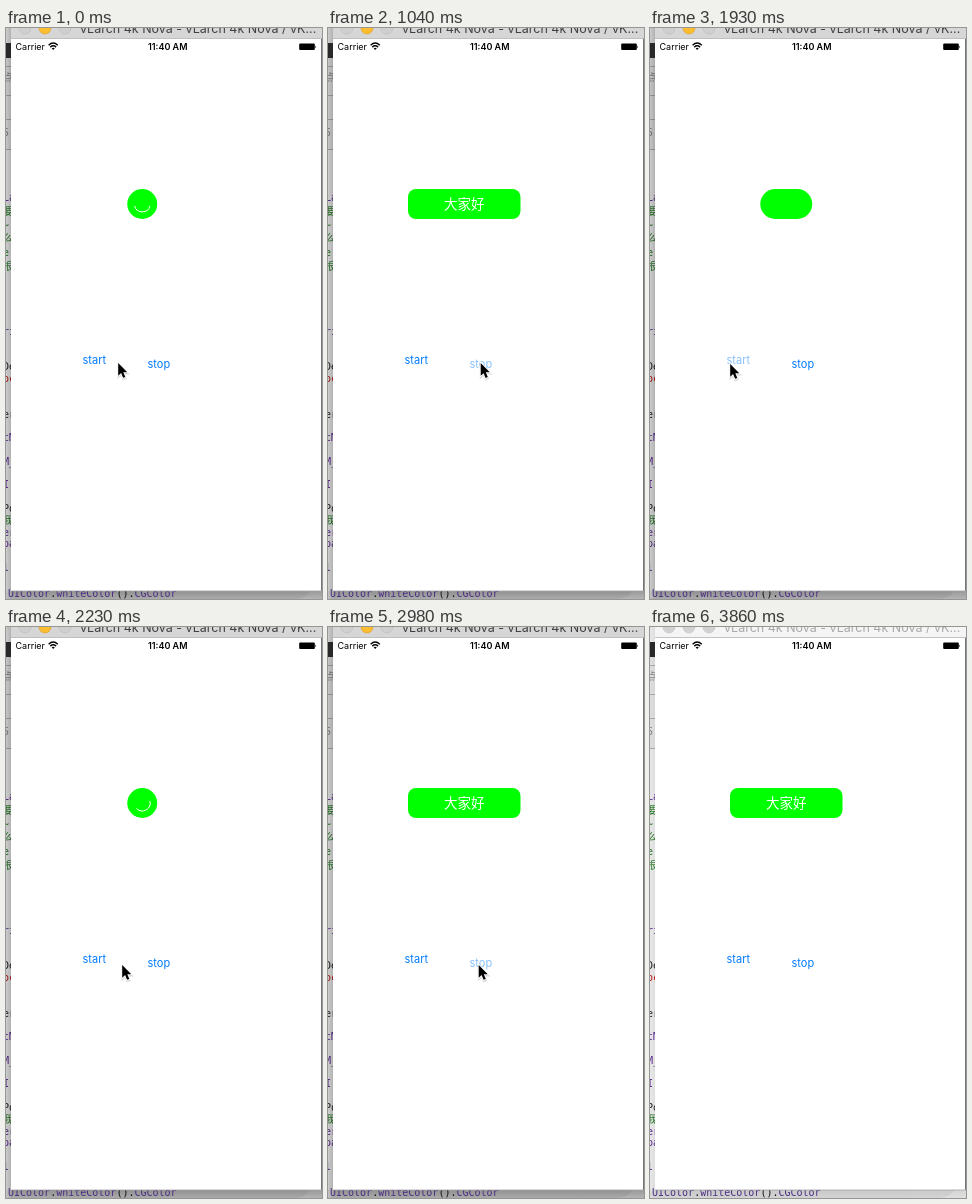
Animation, 316 px wide and 571 px high, one loop 3.99 s. Source, as an HTML page:

```html
<!DOCTYPE html>
<html lang="en">
<head>
<meta charset="utf-8">
<title>Button spinner</title>
<style>
html, body { margin: 0; width: 100%; height: 100%; overflow: hidden; background: #fff; }
svg { display: block; width: 316px; height: 571px; }
text { font-family: Inter, "Open Sans", sans-serif; }
.code text, text.code { font: 10px "DejaVu Sans Mono", "Noto Sans CJK SC", monospace; white-space: pre; }
.label { font-size: 11px; fill: #007aff; }
.status { font-size: 9px; }
.hello { font: 300 13.5px "Noto Sans CJK SC", "Noto Sans CJK", sans-serif; fill: #fff; text-anchor: middle; }
#title { font-size: 12.5px; fill: #414141; }
#bar { fill: #d6d6d6; }
.light { fill: #cfcfcf; stroke: #bebebe; stroke-width: .7; }
#yellow { fill: #fdbd30; stroke: #dfa02b; }
.idle #title { fill: #a9a9a9; }
.idle #bar { fill: #f5f5f5; }
.idle #yellow, .idle .light { fill: #d2d2d2; stroke: #c6c6c6; }
.idle #shade { opacity: .35; }
</style>
</head>
<body>
<svg id="stage" viewBox="0 0 316 571">
  <defs>
    <linearGradient id="side"><stop stop-opacity=".17"/><stop offset="1" stop-opacity=".28"/></linearGradient>
    <linearGradient id="under" x2="0" y2="1"><stop stop-opacity=".38"/><stop offset="1" stop-opacity=".27"/></linearGradient>
    <clipPath id="strip"><rect width="5" height="571"/></clipPath>
    <path id="arrow" d="M0 0V14.6L3.3 11.6 5.6 17 8.1 15.9 5.8 10.7H10.3Z"/>
  </defs>

  <!-- editor behind the window -->
  <rect width="316" height="571" fill="#f6f6f6"/>
  <path d="M0 563H304Q300 571 288 571H0Z" fill="#e9e9e9"/>
  <rect y="30" width="5" height="91" fill="#ededed"/>
  <path d="M0 38.5H5M0 67.5H5M0 91.5H5M0 121.5H5" stroke="#b5b5b5"/>
  <g class="code" id="margin" clip-path="url(#strip)"></g>
  <g id="shade">
    <rect width="5" height="571" fill="url(#side)"/>
    <rect x="5" y="563" width="311" height="8" fill="url(#under)"/>
  </g>
  <rect y="15" width="5" height="15" fill="#292929"/>
  <text class="code" x="2" y="569" fill="#4b2d82">UIColor<tspan fill="#111">.</tspan>whiteColor<tspan fill="#111">().</tspan>CGColor</text>

  <!-- simulator window -->
  <rect x="5" y="10" width="310" height="553" fill="#fff"/>
  <path d="M315.5 10V563" stroke="#757575"/>
  <path d="M5 563H316" stroke="#a2a2a2" stroke-width=".8"/>
  <rect id="bar" x="5" width="311" height="10.5"/>
  <path d="M5 10.5H316" stroke="#b4b4b4" stroke-width=".8"/>
  <circle class="light" cx="19" r="6"/>
  <circle class="light" id="yellow" cx="39" r="6"/>
  <circle class="light" cx="59" r="6"/>
  <text id="title" x="74" y="5.3">vLarch 4k Nova - vLarch 4k Nova / vK...</text>

  <!-- status bar -->
  <text class="status" x="9.5" y="22">Carrier</text>
  <path d="M42.6 17.2Q47.2 13 51.8 17.2M44.3 19.1Q47.2 16.6 50.1 19.1" fill="none" stroke="#000" stroke-width="1.4"/>
  <path d="M45.6 20.3Q47.2 19 48.8 20.3L47.2 22Z"/>
  <text class="status" x="161.7" y="22" font-weight="600" text-anchor="middle">11:40 AM</text>
  <rect x="293.2" y="15.5" width="15.6" height="6.6" rx="1"/>
  <path d="M309.4 17.4Q311 18.8 309.4 20.2Z"/>

  <!-- app -->
  <rect id="pill" y="161" height="30" fill="#0f0"/>
  <text class="hello" id="hello" x="136.25" y="181">大家好</text>
  <path id="arc" fill="none" stroke="#fff"/>
  <text class="label" id="start" x="76.5" y="336">start</text>
  <text class="label" id="stop" x="141.5" y="340">stop</text>

  <g id="cursor">
    <use href="#arrow" transform="translate(.9 2.6) scale(.88)" fill="none" stroke="#000" stroke-opacity=".14" stroke-width="2.4"/>
    <use href="#arrow" transform="translate(.7 1.4) scale(.88)" stroke="#fff" stroke-width="1.8" paint-order="stroke"/>
  </g>
</svg>
<script>
const LOOP = 3990, TICK = 149, CX = 136.25, CY = 176, R = 7.9, SWEEP = 152;
const LEAVE = 3280, IDLE = 3860;
const $ = id => document.getElementById(id);
const show = (id, on) => { $(id).style.display = on ? '' : 'none'; };

// Clipped ends of code lines, one per row
function lines(top, pitch, rows, colour) {
  rows.split('|').forEach((s, i) => {
    $('margin').innerHTML += `<text x="-3" y="${top + i * pitch}" fill="${colour}">${s}</text>`;
  });
}
lines(53, 55, '点|5', '#888');
lines(173, 13.8, 'La', '#5c2699');
lines(186.8, 13.8, '要|~|么|e|根', '#1d7a1d');
lines(307, 11.8, 'ri|||||||||tM||M_||I||||er|pa||l', '#5c2699');
lines(342.4, 11.8, 'De||||er||||||||Po', '#222');
lines(354.2, 11.8, 'oc', '#c41a16');
lines(495.8, 11.8, '我', '#1d7a1d');

// Pointer stops: tick, x, y
const route = [[0, 111.5, 333.5], [3, 152, 334], [8, 152, 333.5], [11, 79.5, 334.5],
  [14, 79.5, 334.5], [15, 115.5, 336.5], [16, 150, 336.5]];

function pointer(k) {
  const i = route.findLastIndex(p => p[0] <= k);
  const [a, x, y] = route[i], [b, x2, y2] = route[i + 1] || [a + 1, x, y];
  const e = 1 - (1 - Math.min(1, (k - a) / (b - a))) ** 1.55;
  return [x + (x2 - x) * e, y + (y2 - y) * e];
}

// A pressed label turns pale, then fades back
const fade = age => age < 0 ? 1 : Math.min(1, .15 + .32 * age);

function point(deg) {
  const a = deg * Math.PI / 180;
  return `${CX + R * Math.cos(a)} ${CY + R * Math.sin(a)}`;
}

function draw(t) {
  // The screen refreshes once per tick
  const k = Math.floor((t + 13) / TICK);
  const second = k > 12;
  const stopAge = k - (second ? 19 : 6), startAge = k - 12;
  const open = stopAge > 0 || startAge === 0;

  const w = open ? 112.5 : second ? Math.max(30, 112.5 - 60.5 * startAge) : 30;
  const pill = $('pill');
  pill.setAttribute('x', CX - w / 2);
  pill.setAttribute('width', w);
  pill.setAttribute('rx', open ? 8 : 15);
  show('hello', open);

  const mid = second ? 60 + 133 * (k - 15) : 90 + 143 * k;
  show('arc', w === 30);
  $('arc').setAttribute('d', `M${point(mid - SWEEP / 2)}A${R} ${R} 0 0 1 ${point(mid + SWEEP / 2)}`);

  $('start').style.opacity = fade(startAge);
  $('stop').style.opacity = fade(stopAge);
  $('cursor').setAttribute('transform', `translate(${pointer(k)})`);
  show('cursor', t < LEAVE);
  $('stage').classList.toggle('idle', t >= IDLE);
}

const begin = performance.now();
function loop() {
  draw((performance.now() - begin) % LOOP);
  requestAnimationFrame(loop);
}
loop();
</script>
</body>
</html>
```
